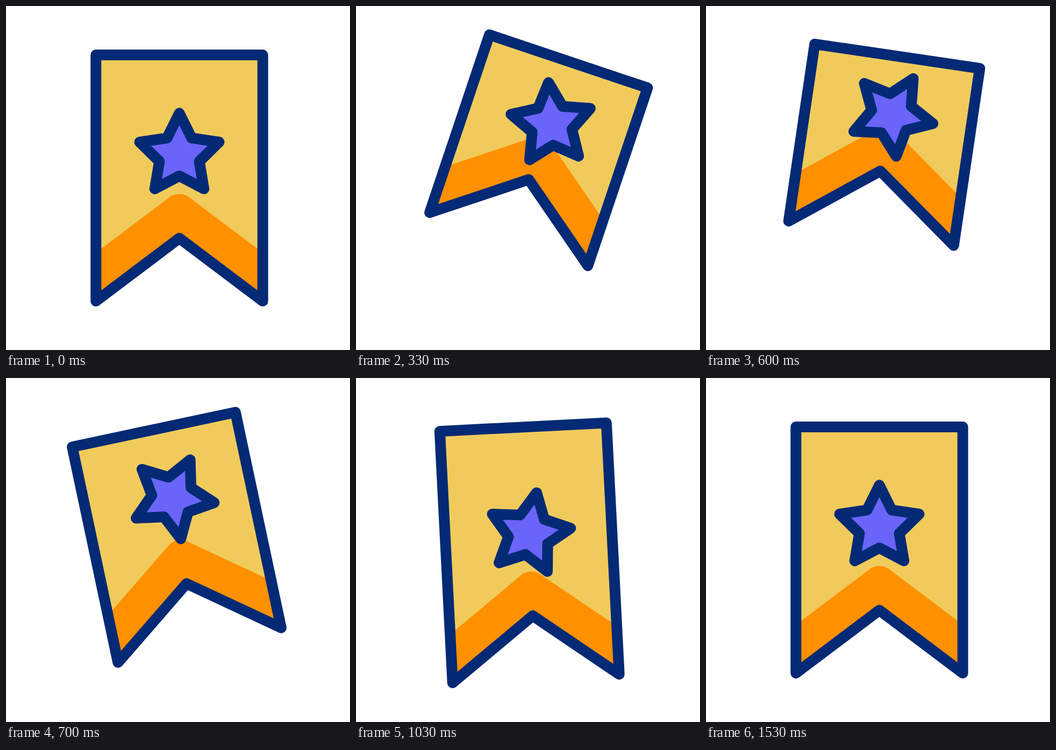
Recreate the animation shown at these times as an HTML page. Size 640x640 px, loop 2000 ms.

```html
<!DOCTYPE html>
<html lang="en">
<head>
<meta charset="utf-8">
<title>Bookmark</title>
<style>
  html, body { margin: 0; width: 100%; height: 100%; overflow: hidden; background: #fff; }
  svg { display: block; width: 100vw; height: 100vh; }
  .line { fill: none; stroke: #042a75; stroke-width: 20; stroke-linejoin: round; }
  #star { fill: #6a64f8; }
</style>
</head>
<body>
<svg viewBox="0 0 640 640">
  <g id="badge">
    <path id="paper" fill="#f0cb5b"/>
    <path id="band" fill="#ff9000"/>
    <path id="edge" class="line"/>
    <path id="star" class="line"/>
  </g>
</svg>
<script>
const LOOP = 2000, FPS = 30;
const CX = 322.5, CY = 319.7;
const HALF = 155.2, TOP = 91, FOOT = 549;
const STAR_Y = 269.7;

const ease = u => u * u * (3 - 2 * u);

// Eased moves through a few [step, value] poses, 30 steps per second.
const poses = (...keys) => step => {
  const next = keys.findIndex(k => k[0] > step);
  if (next < 0) return keys[keys.length - 1][1];
  if (next === 0) return keys[0][1];
  const [s0, v0] = keys[next - 1], [s1, v1] = keys[next];
  return v0 + (v1 - v0) * ease((step - s0) / (s1 - s0));
};

// Wind up to a peak, then swing back and forth with shrinking reach.
function swing(start, top, peak, release, beat, decay, count) {
  const keys = [[start, 0], [top, peak]];
  for (let i = 0; i < count; i++) {
    peak *= -decay;
    keys.push([release + i * beat, peak]);
  }
  return poses(...keys, [release + count * beat, 0]);
}

const turn = swing(0.5, 15, 25.6, 21.4, 4.8, 0.485, 3);
const stretch = poses([0, 0], [13, -126], [17.7, -126], [25, 56], [29, 1], [33, 20], [37, 0]);
const lift = poses([0, 0], [13, -66], [17.7, -66], [27.5, 13], [31, 13], [40.3, 0]);
const spin = poses([0, 0], [14.4, -122], [18, -122], [33, 20], [37, 0]);
const drift = poses([18, 0], [29, 4.3], [36, -2.6], [46, 0]);

const set = (id, name, value) => document.getElementById(id).setAttribute(name, value);

function starPath(cy, outer, inner) {
  const points = Array.from({ length: 10 }, (_, i) => {
    const a = i * Math.PI / 5, r = i % 2 ? inner : outer;
    return `${r * Math.sin(a)} ${cy - r * Math.cos(a)}`;
  });
  return `M${points.join('L')}Z`;
}

function draw(step) {
  const foot = FOOT + stretch(step), notch = foot - 117;
  const left = CX - HALF, right = CX + HALF;
  const tail = `V${foot}L${CX} ${notch}L${left} ${foot}Z`;
  const sheet = `M${left} ${TOP}H${right}${tail}`;
  const brow = foot - 90, bend = notch - 77.4, crest = notch - 84;
  set('paper', 'd', sheet);
  set('edge', 'd', sheet);
  set('band', 'd', `M${left} ${brow}L${CX - 16.6} ${bend}`
    + `C${CX - 7.6} ${crest} ${CX + 7.6} ${crest} ${CX + 16.6} ${bend}L${right} ${brow}${tail}`);
  set('badge', 'transform', `rotate(${turn(step)} ${CX} ${CY})`);
  set('star', 'transform',
    `translate(${CX + drift(step)} ${STAR_Y + lift(step)}) rotate(${spin(step)})`);
}

function tick() {
  const time = performance.now() % LOOP;
  draw(Math.floor(time * FPS / 1000 + 0.15));
  requestAnimationFrame(tick);
}

set('star', 'd', starPath(7.5, 77.8, 39));
tick();
</script>
</body>
</html>
```
